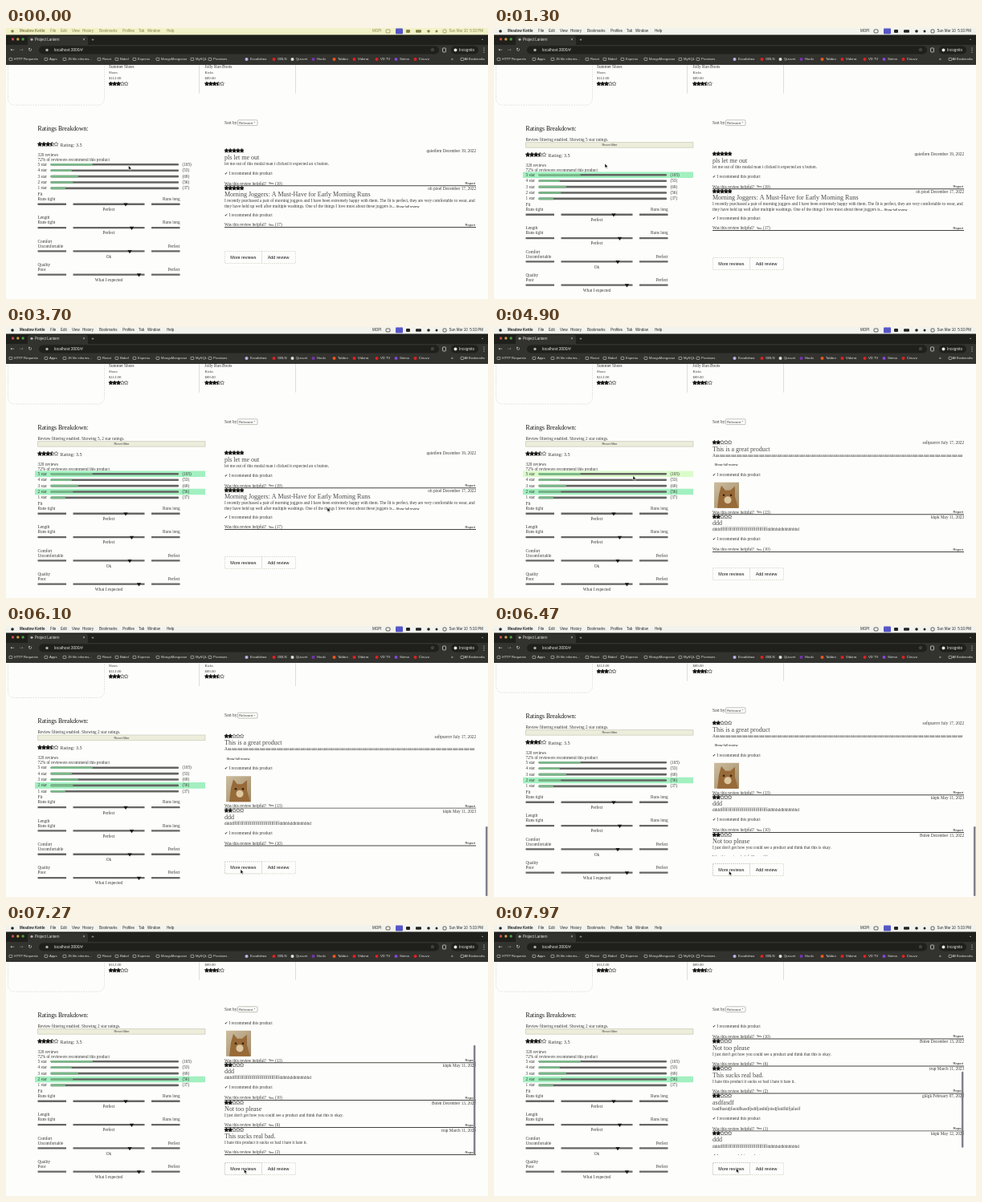
Animation of 600x338 px, one loop 8 s. Source, as an HTML page with a canvas:

```html
<!DOCTYPE html>
<html lang="en">
<head>
<meta charset="utf-8">
<title>Product reviews</title>
<style>
  html, body { margin: 0; width: 100%; height: 100%; overflow: hidden; background: #fdfdfb; }
  canvas { display: block; width: 600px; height: 338px; }
</style>
</head>
<body>
<canvas id="stage" width="600" height="338"></canvas>
<script>
const LOOP = 8000;
const ctx = document.getElementById('stage').getContext('2d');
const SERIF = '"Liberation Serif", serif';
const SANS = '"Liberation Sans", sans-serif';
const SYMBOL = '"DejaVu Sans", sans-serif';
const INK = '#383836', PAPER = '#fdfdfb', EDGE = '#cfcfc4', BLACK = '#141412';
const STRIP = '#1f1f1b', TOOLBAR = '#32322e', LIGHT = '#e4e4e0', THUMB = '#80808a';

const clamp01 = v => Math.min(1, Math.max(0, v));
const smooth = (t, start, length) => {
  const p = clamp01((t - start) / length);
  return p * p * (3 - 2 * p);
};

function text(str, x, y, size = 5.25, { font = SERIF, color = INK, align = 'left', weight = '' } = {}) {
  ctx.font = `${weight} ${size}px ${font}`;
  ctx.fillStyle = color;
  ctx.textAlign = align;
  ctx.textBaseline = 'middle';
  ctx.fillText(str, x, y);
}

function box(x, y, w, h, fill, stroke, radius = 0, dash = []) {
  ctx.beginPath();
  ctx.roundRect(x, y, w, h, radius);
  if (fill) { ctx.fillStyle = fill; ctx.fill(); }
  if (stroke) {
    ctx.strokeStyle = stroke;
    ctx.lineWidth = 0.7;
    ctx.setLineDash(dash);
    ctx.stroke();
    ctx.setLineDash([]);
  }
}

function dot(x, y, r, color) {
  ctx.fillStyle = color;
  ctx.beginPath();
  ctx.arc(x, y, r, 0, 7);
  ctx.fill();
}

function shape(points, fill, stroke) {
  ctx.beginPath();
  points.forEach(([x, y]) => ctx.lineTo(x, y));
  ctx.closePath();
  ctx.fillStyle = fill;
  ctx.fill();
  if (stroke) { ctx.strokeStyle = stroke; ctx.lineWidth = 0.5; ctx.stroke(); }
}

function clipped(x, y, w, h, draw) {
  ctx.save();
  ctx.beginPath();
  ctx.rect(x, y, w, h);
  ctx.clip();
  draw();
  ctx.restore();
}

function stars(x, y, score, pitch = 4.8) {
  const star = i => Array.from({ length: 10 }, (_, k) => {
    const r = pitch * (k % 2 ? 0.27 : 0.54), a = k * Math.PI / 5;
    return [x + (i + 0.5) * pitch + r * Math.sin(a), y - r * Math.cos(a)];
  });
  const row = fill => { for (let i = 0; i < 5; i++) shape(star(i), fill, BLACK); };
  row(PAPER);
  clipped(x - 1, y - 5, score * pitch + 1, 10, () => row(BLACK));
}

// Browser chrome

const MENU = [['File', 55], ['Edit', 68], ['View', 82], ['History', 95], ['Bookmarks', 116],
  ['Profiles', 145], ['Tab', 165], ['Window', 176], ['Help', 200]];
const BOOKMARKS = [['HTTP Requests', 10], ['Apps', 54], ['JS file informs...', 77], ['React', 120],
  ['Babel', 142], ['Express', 164], ['MongoMongoose', 193], ['MySQL', 236], ['Promises', 258],
  ['Excalidraw', 304, '#b9b4e8'], ['OBLN', 338, '#d22'], ['Quivvet', 361, '#ddd'], ['Hoolo', 387, '#73b'],
  ['Tabbro', 413, '#e52'], ['Vidorra', 438, '#d22'], ['VD TV', 466, '#d22'],
  ['Strimo', 490, '#84d'], ['Cinuvo', 514, '#d22']];

function drawBrowser(t) {
  const menuColor = t < 70 ? '#85854c' : '#242424';
  const sans = { font: SANS, color: menuColor };
  const light = { font: SANS, color: LIGHT };
  box(0, 0, 600, 9, t < 70 ? '#f2f2c8' : '#f3f3ee');
  dot(8, 4, 1.8, menuColor);
  text('Meadow Kettle', 17, 4, 4.5, { ...sans, weight: 'bold' });
  MENU.forEach(([label, x]) => text(label, x, 4, 4.5, sans));
  text('MOPI', 456, 4, 4.5, sans);
  box(473, 2, 5, 4, null, menuColor, 1);
  box(485, 0.5, 9, 7, '#5656c8', null, 1);
  box(498, 2, 5, 4, menuColor, null, 1);
  box(510, 2.3, 7, 3.5, menuColor, null, 1);
  dot(526, 4, 1.8, menuColor);
  dot(536, 4, 1.5, menuColor);
  box(544, 2, 4, 4, null, menuColor, 1);
  text('Sun Mar 10  5:33 PM', 594, 4, 4.5, { ...sans, align: 'right' });

  box(0, 8.5, 600, 12.5, STRIP);
  ['#c8504a', '#c8a040', '#4ca050'].forEach((color, i) => dot(8.5 + i * 6.3, 14, 1.7, color));
  box(27, 10, 75, 12, TOOLBAR, null, [3, 3, 0, 0]);
  dot(32, 14.3, 1.6, '#b0b0a8');
  text('Project Lantern', 36, 14.3, 4.5, light);
  text('×', 97, 14.3, 5, { ...light, align: 'center' });
  text('+', 108, 14.3, 6, { ...light, align: 'center' });
  text('⌄', 593, 13.5, 5, { font: SYMBOL, color: LIGHT, align: 'center' });

  box(0, 21, 600, 25, TOOLBAR);
  ['←', '→', '↻'].forEach((icon, i) =>
    text(icon, 8 + i * 11, 27.5, 6, { font: SYMBOL, color: i === 1 ? '#84847e' : LIGHT, align: 'center' }));
  box(41, 22.5, 498, 10, STRIP, null, 5);
  dot(51, 27.5, 1.7, '#b0b0a8');
  text('localhost:3000/#', 60, 27.5, 4.9, light);
  text('☆', 531, 27.3, 6, { font: SYMBOL, color: LIGHT, align: 'center' });
  box(543.5, 25, 4, 5, null, LIGHT, 1);
  box(554, 22.5, 34, 10, STRIP, null, 5);
  dot(559.5, 27.5, 2, LIGHT);
  text('Incognito', 564, 27.5, 4.7, light);
  [25, 27.5, 30].forEach(y => dot(595, y, 0.6, LIGHT));

  const folder = x => box(x, 37.3, 3.8, 3.2, null, '#c0c0b8', 0.6);
  BOOKMARKS.forEach(([label, x, icon]) => {
    if (icon) dot(x - 4.5, 39, 2, icon);
    else folder(x - 6);
    text(label, x, 39.2, 4.2, light);
  });
  text('»', 554, 38.7, 5, light);
  folder(566);
  text('All Bookmarks', 596, 39.2, 4, { ...light, align: 'right' });
}

// Left column

function drawProducts() {
  box(2.5, -30, 120, 125.5, null, EDGE, 8, [1.5, 1.5]);
  [240.5, 360.5].forEach(x => box(x, 30, 0, 51, null, EDGE, 0, [1.5, 1.5]));
  [['Summer Shoes', 'Shoes', '$112.00', 128, 3], ['Jolly Run Boots', 'Kicks', '$89.00', 247.5, 3.5]]
    .forEach(([name, kind, price, x, score]) => {
      text(name, x, 48.5);
      text(kind, x, 55.5, 4.5);
      text(price, x, 62.3, 4.8);
      stars(x, 69, score);
    });
}

const COUNTS = [105, 53, 69, 56, 37];
const TOTAL = 320;
const TRAITS = [['Fit', 'Runs tight', 'Runs long', 'Perfect', 149],
  ['Length', 'Runs tight', 'Runs long', 'Perfect', 156.5],
  ['Comfort', 'Uncomfortable', 'Perfect', 'Ok', 154],
  ['Quality', 'Poor', 'Perfect', 'What I expected', 165.5]];

function drawRatings({ selected, cursor, scroll, hovering }) {
  const shift = selected.length ? 13 : 0;
  text('Ratings Breakdown:', 39.5, 125, 7.7, { color: BLACK });
  if (shift) {
    text(`Review filtering enabled. Showing ${selected.join(', ')} star ratings.`, 39.5, 139);
    box(39.5, 142, 208.5, 6.6, '#ededdc', '#c9c9b8');
    text('Reset filter', 144, 145.4, 4, { font: SANS, align: 'center' });
  }
  ctx.save();
  ctx.translate(0, shift);
  stars(39.5, 144.5, 3.5, 5.1);
  text('Rating: 3.5', 67.5, 145.4, 6.1);
  text(TOTAL + ' reviews', 39.5, 158);
  text('72% of reviewers recommend this product', 39.5, 164);
  COUNTS.forEach((count, i) => {
    const y = 169.7 + i * 7.4, star = 5 - i;
    const hover = hovering && cursor.x > 36 && cursor.x < 248 &&
      Math.abs(cursor.y + scroll - shift - y) < 3.7;
    if (selected.includes(star)) box(36, y - 3.8, 212, 7.6, '#a2f0c0');
    else if (hover) box(36, y - 3.8, 212, 7.6, '#dafcca');
    text(star + ' star', 39.5, y + 0.2);
    box(55.5, y - 1.3, 159.5, 2.6, '#646462', null, 1);
    box(55.5, y - 1.3, 159.5 * count / TOTAL, 2.6, '#78b888', null, 1);
    text(`(${count})`, 219.5, y + 0.2);
  });
  TRAITS.forEach(([name, low, high, verdict, mark], i) => {
    const y = 207 + i * 29.3;
    text(name, 39.5, y);
    text(low, 39.5, y + 6);
    text(high, 216.5, y + 6, 5.25, { align: 'right' });
    [[39.5, 35.5], [83.5, 89], [181, 35.5]].forEach(([x, w]) => box(x, y + 11, w, 2.3, '#666664'));
    shape([[mark - 2.7, y + 10.8], [mark + 2.7, y + 10.8], [mark, y + 15]], BLACK);
    text(verdict, 128, y + 19.2, 5.25, { align: 'center' });
  });
  ctx.restore();
}

// Reviews

const FIVE_STAR = [
  { score: 5, title: 'pls let me out', who: 'quietfern December 19, 2022', votes: 19, rec: true,
    lines: ['let me out of this modal man i clicked it expected an x button.'] },
  { score: 5, title: 'Morning Joggers: A Must-Have for Early Morning Runs', who: 'oh pixel December 17, 2022',
    votes: 17, rec: true, inlineMore: true, lines: [
      'I recently purchased a pair of morning joggers and I have been extremely happy with them. The fit is perfect, they are very comfortable to wear, and',
      'they have held up well after multiple washings. One of the things I love most about these joggers is...'] },
];
const KEYMASH = 'dddd' + 'f'.repeat(35) + 'ddhhhddhhhhhhhd';
const TWO_STAR = [
  { score: 2, title: 'This is a great product', who: 'softpurrrrr July 17, 2022', votes: 13, rec: true,
    more: true, photo: true, lines: ['A' + 'a'.repeat(132)] },
  { score: 2, title: 'ddd', who: 'kkpk May 11, 2023', votes: 10, rec: true, lines: [KEYMASH] },
  { score: 2, title: 'Not too please', who: 'Bolen December 13, 2022', votes: 6,
    lines: ["I just don't get how you could see a product and think that this is okay."] },
  { score: 2, title: 'This sucks real bad.', who: 'trup March 11, 2023', votes: 2,
    lines: ['I hate this product it sucks so bad i hate it hate it.'] },
  { score: 2, title: 'asdfasdf', who: 'gklgk February 07, 2023', votes: 1, rec: true,
    lines: ['lsadfhasidjfaoidfkasdfjsdifjasdkfjoisdjfaidfklfjafaslf'] },
  { score: 2, title: 'ddd', who: 'kkpk May 12, 2023', votes: 0, rec: true, lines: [KEYMASH] },
];

const reviewHeight = r => 34 + (r.rec ? 12.8 : 0) + (r.more ? 12 : 0) + (r.photo ? 34 : 0) + (r.lines.length - 1) * 5;

function drawPhoto(x, y) {
  const wall = ctx.createLinearGradient(x, y, x + 31, y + 32);
  wall.addColorStop(0, '#cdbd9e');
  wall.addColorStop(1, '#a08a68');
  box(x, y, 31, 32, wall);
  shape([[x + 4, y + 32], [x + 6, y + 15], [x + 9, y + 4], [x + 14, y + 10], [x + 20, y + 10],
    [x + 26, y + 5], [x + 26, y + 18], [x + 30, y + 32]], '#976a38');
  dot(x + 17, y + 22, 4.5, '#dcc6a0');
  [12, 21].forEach(dx => dot(x + dx, y + 16, 1.3, '#2c2010'));
}

function drawReview(r, top) {
  const x = 272, bottom = top + reviewHeight(r);
  const small = { font: SANS, color: BLACK };
  stars(x, top + 3, r.score);
  text(r.who, 585, top + 4, 5.25, { align: 'right' });
  text(r.title, x, top + 11.5, 8, { color: '#4a4a4c' });
  r.lines.forEach((line, i) => text(line, x, top + 19.3 + i * 6.3));
  let y = top + 19.3 + (r.lines.length - 1) * 5.5;
  if (r.inlineMore) text('Show full review', 485.5, y + 0.8, 4, small);
  if (r.more) text('Show full review', x + 2.5, y += 12, 4, small);
  if (r.rec) {
    y += 12;
    text('✔', x, y, 5, { font: SYMBOL });
    text('I recommend this product', x + 5.5, y);
  }
  if (r.photo) drawPhoto(x + 2, y + 9.5);
  text('Was this review helpful?', x, bottom - 2.5);
  text('Yes', 330, bottom - 3.2, 4, { ...small, align: 'center' });
  text(`(${r.votes})`, 335, bottom - 2.5);
  text('Report', 584, bottom - 2.8, 4.2, { ...small, align: 'right' });
  box(x, bottom - 0.5, 313, 0.9, '#444440');
}

function drawReviews({ selected, expanded, reviews, listScroll, listBar, overMore }) {
  const filtered = selected.length > 0, lowOnly = selected.join() === '2';
  text('Sort by:', 272, 117.3);
  box(288.5, 113.8, 24.5, 6.8, PAPER, '#a8a8a0', 1);
  text('Relevant', 290, 117.4, 4.3, { font: SANS });
  text('⌄', 309.5, 116.3, 4, { font: SYMBOL, align: 'center' });

  const top = expanded ? 130 : lowOnly ? 140 : filtered ? 153 : 149;
  const view = expanded ? 169 : 150;
  clipped(260, top - 1, 330, view + 1, () => {
    let y = top - listScroll;
    reviews.forEach(r => { drawReview(r, y); y += reviewHeight(r); });
  });
  if (listBar) {
    const total = reviews.reduce((sum, r) => sum + reviewHeight(r), 0);
    box(582, top + listScroll / total * view, 2.4, view * view / total, THUMB, null, 1.2);
  }

  const y = expanded ? 316 : lowOnly ? 307 : filtered ? 293 : 285;
  const label = { font: SANS, color: BLACK, align: 'center' };
  box(272.5, y - 7.5, 46, 15, PAPER, overMore ? '#b4b4a8' : EDGE, 0, [1.5, 1]);
  box(318.5, y - 7.5, 42, 15, PAPER, EDGE, 0, [1.5, 1]);
  text('More reviews', 295.3, y + 0.2, 5.4, label);
  text('Add review', 339, y + 0.2, 5.4, label);
}

// Timeline

const CURSOR_PATH = [[0, 152.5, 171.5], [450, 152.5, 171.5], [900, 146, 168], [1300, 138, 169],
  [1800, 139, 176], [2300, 153, 205], [2950, 153, 205], [3350, 330, 245], [3700, 400, 225],
  [4200, 240, 200], [4550, 173, 185.5], [5150, 173, 185.5], [5400, 190, 200], [5950, 291, 300],
  [6200, 292.5, 305.5], [6600, 292.5, 305.5], [7200, 296, 304.5], [7650, 301.5, 303.5], [LOOP, 301.5, 303.5]];

function cursorAt(t) {
  const i = CURSOR_PATH.findIndex(([time]) => time > t);
  const [t0, x0, y0] = CURSOR_PATH[i - 1], [t1, x1, y1] = CURSOR_PATH[i];
  const p = smooth(t, t0, t1 - t0);
  return { x: x0 + (x1 - x0) * p, y: y0 + (y1 - y0) * p };
}

function stateAt(t) {
  const selected = t < 450 ? [] : t < 2700 ? [5] : t < 4650 ? [5, 2] : [2];
  const expanded = t >= 6300;
  const visible = t >= 7640 ? 6 : expanded ? 4 : 2;
  return {
    selected, expanded,
    cursor: cursorAt(t),
    hovering: t >= 70,
    overMore: t >= 5950,
    scroll: 13 * smooth(t, 6000, 200),
    pageBar: t >= 6000 && t < 6950,
    listBar: t >= 6850,
    listScroll: 39 * smooth(t, 6850, 350) + 93 * smooth(t, 7660, 425),
    reviews: selected.includes(5) || !selected.length ? FIVE_STAR : TWO_STAR.slice(0, visible),
  };
}

function drawCursor({ x, y }) {
  const outline = [[0, 0], [0, 5.4], [1.3, 4.3], [2.2, 6.2], [3.1, 5.8], [2.3, 4], [3.9, 3.9]];
  shape(outline.map(([dx, dy]) => [x + dx, y + dy]), '#080808', '#fff');
}

function frame(now) {
  const t = now % LOOP, state = stateAt(t);
  box(0, 0, 600, 338, PAPER);
  ctx.save();
  ctx.translate(0, 0.6 - state.scroll);
  drawProducts();
  drawRatings(state);
  ctx.translate(0, 0.4);
  drawReviews(state);
  ctx.restore();
  if (state.pageBar) box(597, 250, 2.5, 87, THUMB, null, 1.2);
  drawBrowser(t);
  drawCursor(state.cursor);
  requestAnimationFrame(frame);
}
requestAnimationFrame(frame);
</script>
</body>
</html>
```
